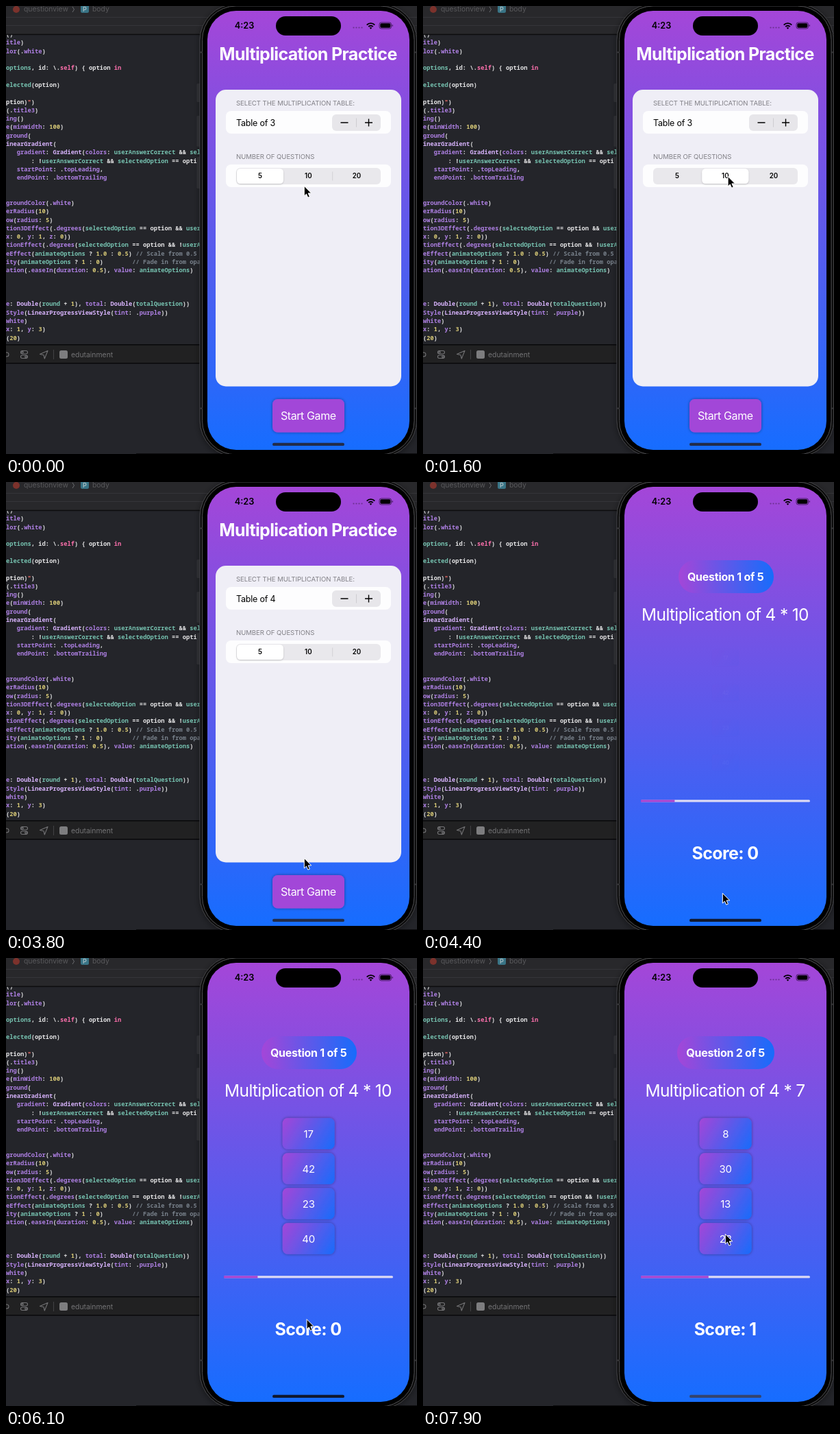
Animation of 600 by 653 pixels, one loop 8000 ms. Source, as an HTML page:

```html
<!DOCTYPE html>
<html lang="en">
<head>
<meta charset="utf-8">
<title>Multiplication Practice</title>
<style>
html, body { margin: 0; width: 100%; height: 100%; overflow: hidden; background: #24252a; }
svg { display: block; width: 600px; height: 653px; font-family: Inter, "Liberation Sans", sans-serif; font-optical-sizing: none; }
text { white-space: pre; }
#code { font: 600 8.78px "Noto Sans Mono", "DejaVu Sans Mono", monospace; }
.mid { text-anchor: middle; }
.white { fill: #fff; }
.big { font-size: 25px; font-weight: 700; letter-spacing: -.65px; }
.label { font-size: 9.6px; letter-spacing: -.06px; fill: #828187; }
.seg { font-size: 9.75px; font-weight: 600; }
.bar { font-size: 10.4px; }
</style>
</head>
<body>
<svg viewBox="0 0 600 653">
  <defs>
    <linearGradient id="sky" gradientUnits="userSpaceOnUse" x1="0" y1="7" x2="0" y2="647">
      <stop stop-color="#a446d8"/><stop offset="1" stop-color="#166dff"/>
    </linearGradient>
    <linearGradient id="pillFill">
      <stop stop-color="#a446d8"/><stop offset="1" stop-color="#176cfb"/>
    </linearGradient>
    <linearGradient id="optFill" gradientUnits="userSpaceOnUse" x1="-38" y1="-23" x2="38" y2="23">
      <stop stop-color="#a446d8"/><stop offset="1" stop-color="#176cfb"/>
    </linearGradient>
    <filter id="shade" x="-10%" y="-5%" width="120%" height="110%">
      <feDropShadow dx="0" dy="2" stdDeviation="5" flood-color="#000" flood-opacity=".4"/>
    </filter>
    <filter id="glow" x="-20%" y="-30%" width="140%" height="160%">
      <feDropShadow dx="0" dy="0" stdDeviation="2.2" flood-color="#000" flood-opacity=".4"/>
    </filter>
    <filter id="soft" x="-20%" y="-30%" width="140%" height="170%">
      <feDropShadow dx="0" dy="1" stdDeviation="1.2" flood-color="#000" flood-opacity=".2"/>
    </filter>
  </defs>

  <!-- editor -->
  <rect width="600" height="653" fill="#24252a"/>
  <g id="code"></g>
  <rect width="600" height="41" fill="#28282b"/>
  <path d="M0 16.5H600M0 28.5H600" stroke="#353539"/>
  <path d="M0 41.5H600" stroke="#0c0c0e" stroke-width="1.5"/>
  <circle cx="15" cy="5" r="5" fill="#7c322c"/>
  <g class="bar" fill="#58585b">
    <text x="26" y="8">questionview</text>
    <path d="M97 1l2.5 4-2.5 4" fill="none" stroke="#6a6b6f"/>
    <rect x="109" y="-2" width="12" height="12" rx="2.5" fill="#397486"/>
    <text x="115" y="8" class="mid" style="font-size:9px;font-weight:600" fill="#a9bcc2">P</text>
    <text x="126" y="8">body</text>
  </g>
  <rect y="494" width="600" height="27" fill="#212122"/>
  <path d="M0 493.8H600M0 520.8H600" stroke="#08080a" stroke-width="1.4"/>
  <path d="M190 652.5H600" stroke="#0b0b0d"/>
  <g fill="none" stroke="#737375" stroke-width="1.1">
    <circle cx="1" cy="508" r="3"/>
    <rect x="21.5" y="502.5" width="10" height="4.5" rx="2.2"/>
    <rect x="21.5" y="509" width="10" height="4.5" rx="2.2"/>
    <circle cx="24" cy="504.7" r="1.3"/><circle cx="29" cy="511.2" r="1.3"/>
    <path d="M61 502.5L49.5 507.5L55 508.7L56.3 514Z" stroke-linejoin="round"/>
    <path d="M69.5 501V515" stroke="#414143"/>
  </g>
  <rect x="78" y="502" width="12" height="12" rx="2.5" fill="#7d7d7f"/>
  <text x="95" y="511.5" class="bar" fill="#737375">edutainment</text>

  <!-- phone body -->
  <g fill="#333438">
    <rect x="278.5" y="113" width="6" height="27" rx="1.5"/>
    <rect x="278.5" y="160" width="6" height="45" rx="1.5"/>
    <rect x="278.5" y="220" width="6" height="46" rx="1.5"/>
  </g>
  <rect x="283" y="-3" width="316.5" height="660" rx="53" fill="#0b0b0c" stroke="#444447" filter="url(#shade)"/>
  <rect x="286.5" y="0" width="309.5" height="654" rx="49.5" fill="#000" stroke="#515154"/>
  <path d="M283 67.5h4M283 586.5h4M596 67.5h4M596 586.5h4" stroke="#38383a" stroke-width="2"/>
  <rect x="294" y="7" width="295" height="640" rx="42" fill="url(#sky)"/>

  <!-- status bar -->
  <rect x="394" y="15" width="95" height="28" rx="14"/>
  <text x="348" y="33" class="mid" style="font-size:12.75px;font-weight:600">4:23</text>
  <g fill="#6c318f">
    <circle cx="507.5" cy="31.5" r="1.1"/><circle cx="511.5" cy="31.5" r="1.1"/>
    <circle cx="515.5" cy="31.5" r="1.1"/><circle cx="519.5" cy="31.5" r="1.1"/>
  </g>
  <g fill="none" stroke="#000" stroke-width="1.9">
    <path d="M526.7 27.6a8 8 0 0 1 11.6 0"/><path d="M529.2 30.2a4.6 4.6 0 0 1 6.6 0"/>
  </g>
  <path d="M530.7 31.8a2.6 2.6 0 0 1 3.6 0l-1.8 2z"/>
  <rect x="545" y="24" width="17.5" height="9" rx="2.8" fill="none" stroke="#451c60"/>
  <rect x="546.3" y="25.3" width="15" height="6.4" rx="1.6"/>
  <path d="M563.7 27v3q1.3-.4 1.3-1.5t-1.3-1.5" fill="#451c60"/>

  <!-- settings screen -->
  <g id="setup">
    <text x="441" y="78.5" class="mid big white">Multiplication Practice</text>
    <rect x="306" y="122" width="271" height="432.5" rx="15" fill="#efeef6"/>
    <text x="336" y="145.3" class="label">SELECT THE MULTIPLICATION TABLE:</text>
    <text x="336" y="222.6" class="label">NUMBER OF QUESTIONS</text>
    <rect x="321" y="153" width="241" height="33" rx="7.5" fill="#fdfdfe"/>
    <rect x="321" y="231" width="241" height="33" rx="7.5" fill="#fdfdfe"/>
    <text id="table" x="336" y="174.6" style="font-size:12.5px;letter-spacing:-.2px"></text>
    <rect x="476" y="158" width="71" height="24" rx="6" fill="#e7e6ea"/>
    <path d="M511.5 163.5V176.5" stroke="#cdccd1"/>
    <path d="M488.5 170h11M524 170h11M529.5 164.5v11" stroke="#000" stroke-width="1.4"/>
    <rect x="336" y="236" width="211" height="24" rx="6" fill="#e9e8ec"/>
    <path id="divider" d="M476.7 241.5V254.5" stroke="#d2d1d6"/>
    <rect id="thumb" x="337" y="237" width="68" height="22" rx="5.2" fill="#fff" filter="url(#soft)"/>
    <text x="371" y="251.4" class="mid seg">5</text>
    <text x="441.3" y="251.4" class="mid seg">10</text>
    <text x="512" y="251.4" class="mid seg">20</text>
    <rect x="389" y="573" width="105" height="48.5" rx="7.5" fill="#a246d8" filter="url(#glow)"/>
    <text x="441.3" y="603.2" class="mid white" style="font-size:16px;letter-spacing:-.4px">Start Game</text>
  </g>

  <!-- game screen -->
  <g id="game">
    <rect id="pill" y="114" height="48" rx="24" fill="url(#pillFill)"/>
    <text id="count" x="441.7" y="144.2" class="mid white" style="font-size:16px;font-weight:700;letter-spacing:-.25px"></text>
    <text id="task" x="441" y="202.3" class="mid white" style="font-size:24.5px;letter-spacing:-.66px"></text>
    <g id="options"></g>
    <rect x="318" y="463.3" width="247" height="3.2" rx="1.6" fill="#dcd9f4"/>
    <rect id="progress" x="318" y="463.3" height="3.2" fill="#a640d0"/>
    <text id="score" x="441" y="550" class="mid big white"></text>
  </g>

  <rect id="home" x="389" y="636.7" width="105" height="4.4" rx="2.2"/>
  <path id="cursor" d="M.3 .4V15L3.5 12L5.8 17.2L8.4 16.1L6.1 10.9H10.7Z" stroke="#fff" stroke-width="1" stroke-linejoin="round"/>
</svg>

<script>
const LOOP = 8000, STEP = 100;
const NS = 'http://www.w3.org/2000/svg';
const $ = id => document.getElementById(id);

function add(parent, tag, attrs, text = '') {
  const el = document.createElementNS(NS, tag);
  for (const k in attrs) el.setAttribute(k, attrs[k]);
  el.textContent = text;
  return parent.appendChild(el);
}

// Code listing: "|x" switches to colour x, each line is [row, text].
const colors = { w: '#e4e4e5', p: '#ad7fe2', l: '#d6b2fb', t: '#76c2b0', y: '#d6c876', k: '#fb6fab', r: '#f8706a', c: '#78818b' };
const lines = [
  [0, '()'],
  [1, '|pitle|w)'],
  [2, '|plor|w(.|pwhite|w)'],
  [4, '|toptions|w, id: \\.|kself|w) { option |kin'],
  [6, '|telected|w(option)'],
  [8, '|wption)|r"|w)'],
  [9, '(.|ptitle3|w)'],
  [10, '|ping|w()'],
  [11, '|pe|w(|pminWidth|w: |y100|w)'],
  [12, '|pground|w('],
  [13, '|linearGradient|w('],
  [14, '   |pgradient|w: |lGradient|w(|pcolors|w: |tuserAnswerCorrect|w && |tselect'],
  [15, '       : !|tuserAnswerCorrect|w && |tselectedOption|w == option'],
  [16, '   |pstartPoint|w: .|ptopLeading|w,'],
  [17, '   |pendPoint|w: .|pbottomTrailing'],
  [20, '|pgroundColor|w(.|pwhite|w)'],
  [21, '|perRadius|w(|y10|w)'],
  [22, '|pow|w(|pradius|w: |y5|w)'],
  [23, '|ption3DEffect|w(.|pdegrees|w(|tselectedOption|w == option && |tuserAn'],
  [24, '|px|w: |y0|w, |py|w: |y1|w, |pz|w: |y0|w))'],
  [25, '|ptionEffect|w(.|pdegrees|w(|tselectedOption|w == option && !|tuserAn'],
  [26, '|peEffect|w(|tanimateOptions|w ? |y1.0|w : |y0.5|w) |c// Scale from 0.5'],
  [27, '|pity|w(|tanimateOptions|w ? |y1|w : |y0|w)        |c// Fade in from opac'],
  [28, '|pation|w(.|peaseIn|w(|pduration|w: |y0.5|w), |pvalue|w: |tanimateOptions|w)'],
  [32, '|pe|w: |lDouble|w(|tround|w + |y1|w), |ptotal|w: |lDouble|w(|ttotalQuestion|w))'],
  [33, '|pStyle|w(|lLinearProgressViewStyle|w(|ptint|w: .|ppurple|w))'],
  [34, '|pwhite|w)'],
  [35, '|px|w: |y1|w, |py|w: |y3|w)'],
  [36, '(|y20|w)'],
  [37, '|pom|w(|y0|w)']
];
for (const [row, src] of lines) {
  const line = add($('code'), 'text', { x: 0, y: 44.2 + row * 12.29 });
  const parts = (src[0] === '|' ? src : '|w' + src).slice(1).split('|');
  for (const part of parts) add(line, 'tspan', { fill: colors[part[0]] }, part.slice(1));
}

const options = [0, 1, 2, 3].map(i => {
  const g = add($('options'), 'g', {});
  add(g, 'rect', { x: -38, y: -22.7, width: 76, height: 45.4, rx: 7.5, fill: 'url(#optFill)', filter: 'url(#glow)' });
  const label = add(g, 'text', { y: 5.5, class: 'mid white', style: 'font-size:15px;letter-spacing:-.2px' });
  return { g, label, y: 256 + i * 51 };
});

const rounds = [
  { task: '4 * 10', answers: [17, 42, 23, 40], pill: [373, 139] },
  { task: '4 * 7', answers: [8, 30, 13, 28], pill: [371, 142] }
];

// Event times in ms
const PICK_TEN = 1100, PICK_FIVE = 2345, SLIDE = 250, ADD = 3150;
const START = 4300, GROW = 500, ANSWER = 7100, SPIN = 500, NEXT = 7600;

// time, x, y of the pointer tip
const path = [
  [0, 435, 262], [200, 435, 262], [800, 450, 248], [1500, 450, 248], [2100, 380, 248],
  [2550, 380, 248], [2950, 529, 169], [3250, 529, 169], [3800, 435, 548], [4150, 437, 599],
  [5700, 437, 599], [6700, 442, 392], [7000, 442, 392], [7200, 441, 402], [LOOP, 441, 402]
];

const clamp = v => Math.max(0, Math.min(1, v));
const ease = v => v * v * (3 - 2 * v);
const phase = (t, from, span) => clamp((t - from) / span);

function pointer(t) {
  const i = path.findIndex(p => p[0] > t);
  const [t0, x0, y0] = path[i - 1], [t1, x1, y1] = path[i];
  const k = ease((t - t0) / (t1 - t0));
  return [x0 + (x1 - x0) * k, y0 + (y1 - y0) * k];
}

function drawSetup(t) {
  const pos = ease(phase(t, PICK_TEN, SLIDE)) - ease(phase(t, PICK_FIVE, SLIDE));
  $('thumb').setAttribute('x', 337 + pos * 70.3);
  $('divider').setAttribute('opacity', clamp(1 - 2 * pos));
  $('table').textContent = 'Table of ' + (t < ADD ? 3 : 4);
}

function drawGame(t) {
  const n = t < NEXT ? 0 : 1;
  const { task, answers, pill } = rounds[n];
  $('pill').setAttribute('x', pill[0]);
  $('pill').setAttribute('width', pill[1]);
  $('count').textContent = `Question ${n + 1} of 5`;
  $('task').textContent = 'Multiplication of ' + task;
  $('progress').setAttribute('width', 49.4 * (n + 1));
  $('score').textContent = 'Score: ' + (t < ANSWER ? 0 : 1);
  const grow = phase(t, START, GROW) ** 2;
  const size = .5 + grow / 2;
  const turn = Math.cos(2 * Math.PI * ease(phase(t, ANSWER, SPIN)));
  options.forEach(({ g, label, y }, i) => {
    const sx = i === 3 ? size * turn : size;
    g.setAttribute('transform', `translate(441.7 ${y}) scale(${sx} ${size})`);
    g.setAttribute('opacity', grow);
    label.textContent = answers[i];
  });
}

function draw(t) {
  const playing = t >= START;
  $('setup').style.display = playing ? 'none' : '';
  $('game').style.display = playing ? '' : 'none';
  (playing ? drawGame : drawSetup)(t);
  $('home').setAttribute('fill', !playing ? '#222c4a' : t < NEXT ? '#10182f' : '#34446f');
  $('cursor').setAttribute('transform', `translate(${pointer(t)})`);
}

function tick() {
  draw(Math.floor(performance.now() % LOOP / STEP) * STEP);
  requestAnimationFrame(tick);
}
tick();
</script>
</body>
</html>
```
